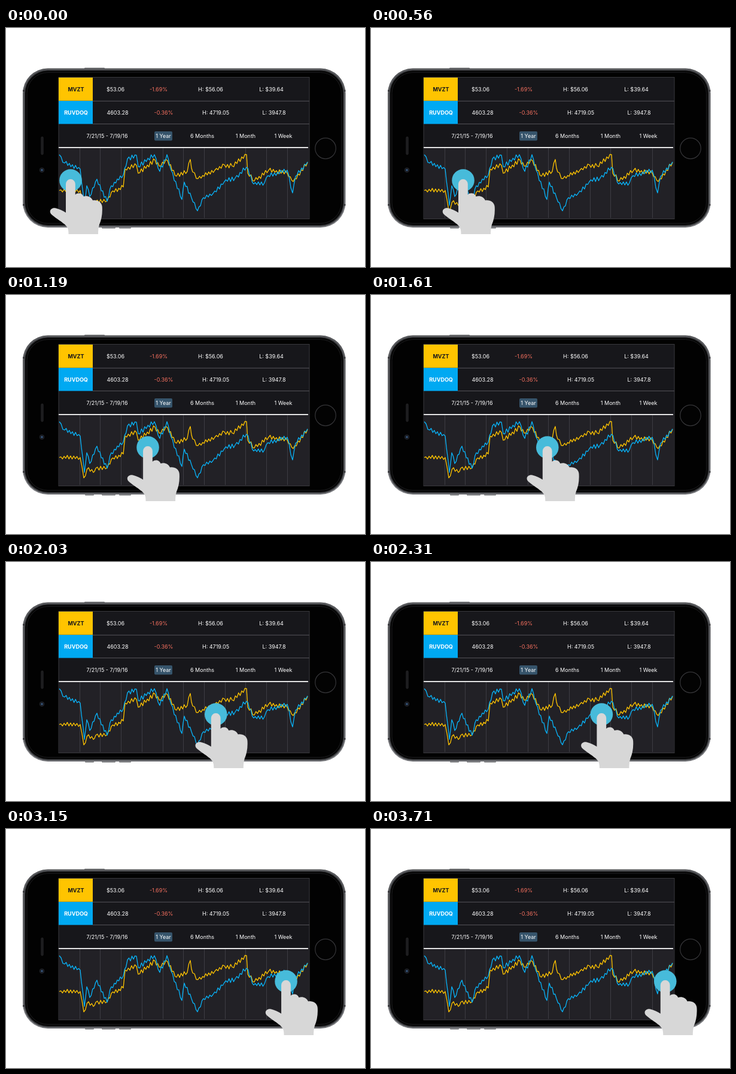
Animation, 600 px wide and 400 px high, one loop 3.78 s. Source, as an HTML page:

```html
<!DOCTYPE html>
<html lang="en">
<head>
<meta charset="utf-8">
<title>Stock comparison chart</title>
<style>
  html, body { margin: 0; width: 600px; height: 400px; overflow: hidden; background: #fff; }
  svg { display: block; }
  text { font: 9px Inter, Roboto, sans-serif; fill: #fff; text-anchor: middle; }
  .tag { font-weight: 700; }
  .dark { fill: #16151a; }
  .down { fill: #f5705f; }
  .series { fill: none; stroke-width: 1.3; stroke-linejoin: round; }
</style>
</head>
<body>
<svg width="600" height="400" viewBox="0 0 600 400">
  <defs>
    <linearGradient id="rim" x2="0" y2="1">
      <stop offset="0" stop-color="#4a4b4e"/>
      <stop offset=".5" stop-color="#5b5c60"/>
      <stop offset="1" stop-color="#77787c"/>
    </linearGradient>
  </defs>

  <g fill="#77787b">
    <rect x="131" y="66.500" width="34" height="4" rx="1"/>
    <rect x="132" y="331" width="15" height="4.500" rx="1"/>
    <rect x="160" y="331" width="23" height="4.500" rx="1"/>
    <rect x="189" y="331" width="20" height="4.500" rx="1"/>
  </g>
  <rect x="28" y="67.500" width="539.500" height="266.500" rx="42" fill="url(#rim)"/>
  <rect x="29.800" y="69.300" width="535.900" height="262.900" rx="40" fill="#3a3b3e" stroke="#7d7e82" stroke-width=".8"/>
  <rect x="32" y="71.500" width="531.500" height="258.500" rx="38" fill="#060606"/>
  <rect x="35" y="74.500" width="525.500" height="252.500" rx="35" fill="#020202" stroke="#1c1c1e"/>
  <path d="M28 105h3.500M28 296h3.500M564 105h3.500M564 296h3.500" stroke="#39393c" stroke-width="3"/>
  <rect x="58.700" y="182" width="3.600" height="30" rx="1.800" fill="#1d1d1f" stroke="#2c2c2e" stroke-width=".6"/>
  <circle cx="60" cy="237.700" r="3.800" fill="#15181f" stroke="#2a2c31" stroke-width=".8"/>
  <circle cx="60" cy="237.700" r="1.700" fill="#3a5a80"/>
  <circle cx="534" cy="201.500" r="17.300" fill="#030303" stroke="#353538" stroke-width="1.200"/>

  <rect x="88" y="82.500" width="419" height="237" fill="#17171b" stroke="#3a3a3e"/>
  <rect x="88" y="200" width="418.500" height="119" fill="#222126"/>
  <rect x="88" y="83" width="57" height="38.800" fill="#ffc400"/>
  <rect x="88" y="122" width="57" height="38.600" fill="#00a9f2"/>
  <path d="M145 122.300H507M145 160.600H507" stroke="#55545a"/>
  <rect x="248" y="173" width="30" height="15.500" rx="2" fill="#36546b"/>
  <g id="labels"></g>
  <path id="grid" stroke="#3d3c43"/>
  <path d="M88 200.200H505" stroke="#fff" stroke-width="1.800"/>
  <path id="gold" class="series" stroke="#ffc400"/>
  <path id="blue" class="series" stroke="#08b4fa"/>

  <g id="hand">
    <circle r="18.800" fill="#47bbda"/>
    <path fill="#d7d7d7" d="M-8 6A7.800 7.800 0 0 1 7.800 6V24C12 20 19 21 21.500 27C27 25 34 27 37 33.500C44 32 52 36 52.700 44C53.500 56 51.500 66 48 74C46.500 79 46 84 46 90H-3.500C-3.500 83 -4 79 -10 73.500C-18 67 -27 62 -33 56C-37 50 -31 45 -25 46.500C-18 48 -13 51 -8 54Z"/>
  </g>
</svg>
<script>
const $ = id => document.getElementById(id);
const LOOP = 3780, STEP = 70;

// Each row: baseline y, then [text, centre x, class]
const rows = [
  [106.3, ["MVZT", 117, "tag dark"], ["$53.06", 183], ["-1.69%", 255, "down"], ["H: $56.06", 342], ["L: $39.64", 443.5]],
  [145.2, ["RUVDOQ", 117, "tag"], ["4603.28", 186.5], ["-0.36%", 263.5, "down"], ["H: 4719.05", 350.5], ["L: 3947.8", 448]],
  [183.8, ["7/21/15 - 7/19/16", 169], ["1 Year", 263], ["6 Months", 328], ["1 Month", 400.5], ["1 Week", 463.5]]
];
for (const [y, ...cells] of rows) {
  for (const [str, x, cls = ""] of cells) {
    const el = document.createElementNS("http://www.w3.org/2000/svg", "text");
    el.textContent = str;
    el.setAttribute("x", x);
    el.setAttribute("y", y);
    el.setAttribute("class", cls);
    $("labels").append(el);
  }
}

let grid = "";
for (let i = 1; i <= 11; i++) grid += `M${Math.floor(88.5 + i * 34.7) + .5} 201V318`;
$("grid").setAttribute("d", grid);

function seeded(seed) {
  return () => (seed = seed * 16807 % 2147483647) / 2147483647;
}

// Joins the turning points with a zigzag of daily noise
function market(turns, seed, noise) {
  const rand = seeded(seed);
  let d = "M" + turns[0], up = 1;
  for (let i = 1; i < turns.length; i++) {
    const [x0, y0] = turns[i - 1], [x1, y1] = turns[i];
    const n = Math.max(1, Math.round((x1 - x0) / 2.6));
    for (let k = 1; k < n; k++) {
      up = -up;
      const y = y0 + (y1 - y0) * k / n + up * noise * (.3 + .7 * rand());
      d += `L${x0 + (x1 - x0) * k / n} ${y}`;
    }
    d += "L" + turns[i];
  }
  return d;
}
$("gold").setAttribute("d", market([
  [89, 272], [124, 272], [130, 306], [138, 289], [146, 297], [150, 290], [169, 289], [176, 275],
  [196, 266], [199, 236], [218, 230], [221, 243], [249, 221], [256, 231], [270, 222], [285, 248],
  [303, 240], [308, 220], [312, 241], [321, 252], [349, 238], [365, 229], [378, 231], [402, 212],
  [404, 243], [415, 256], [439, 238], [470, 243], [480, 257], [504, 225]
], 11, 4));
$("blue").setAttribute("d", market([
  [89, 212], [98, 226], [124, 236], [131, 297], [135, 264], [140, 282], [152, 253], [169, 290],
  [176, 264], [196, 246], [203, 219], [218, 213], [221, 232], [248, 212], [257, 240], [269, 212],
  [276, 238], [294, 287], [298, 258], [310, 284], [320, 306], [330, 284], [346, 277], [365, 257],
  [383, 251], [402, 233], [414, 261], [432, 259], [438, 247], [470, 238], [479, 276], [484, 248], [504, 224]
], 29, 4));

// Swipe: time in s, x in px, speed in px/s
const swipe = [
  [0, 108, 15], [.56, 154, 116], [1.12, 227.5, 136], [2.24, 377, 121], [3.36, 481, 52], [3.71, 491.8, 3]
];
function swipeX(s) {
  const i = swipe.findIndex(([t], k) => k && s <= t);
  const [t0, x0, v0] = swipe[i - 1], [t1, x1, v1] = swipe[i];
  const h = t1 - t0, u = (s - t0) / h, w = 1 - u;
  return x0 + (x1 - x0) * u * u * (3 - 2 * u) + h * u * w * (v0 * w - v1 * u);
}

function draw(ms) {
  const t = Math.floor((ms % LOOP) / STEP) * STEP;
  $("hand").setAttribute("transform", `translate(${swipeX(t / 1000).toFixed(2)} 255)`);
}

let start;
function tick(now) {
  start ??= now;
  draw(now - start);
  requestAnimationFrame(tick);
}
draw(0);
requestAnimationFrame(tick);
</script>
</body>
</html>
```
